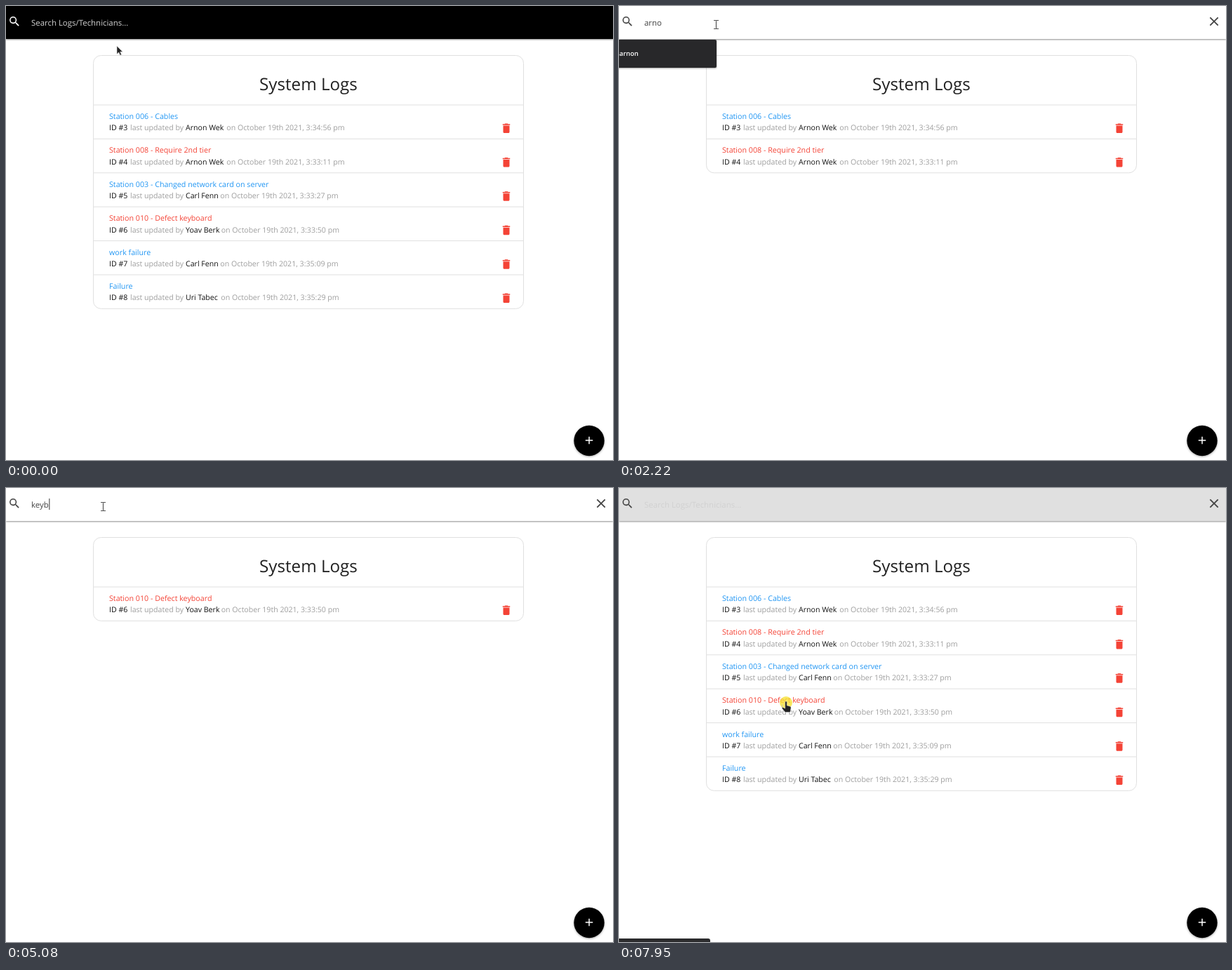
An HTML page that plays this animation: 865x647 px, repeating every 8000 ms.

```html
<!DOCTYPE html>
<html lang="en">
<head>
<meta charset="utf-8">
<title>System Logs</title>
<style>
  html, body { margin: 0; width: 100%; height: 100%; overflow: hidden; background: #fff; }
  svg { display: block; width: 100%; height: 100%; }
  text { font-family: "Open Sans", "Noto Sans", sans-serif; text-rendering: geometricPrecision; white-space: pre; }
  #nav { filter: drop-shadow(0 1px 1px rgba(0,0,0,.45)); }
  #fab { filter: drop-shadow(0 1.5px 1.5px rgba(0,0,0,.35)); }
  #input, #hint { font-size: 11.45px; }
  #hint { fill: #d1d1d1; }
  #input { fill: #444; }
  #heading { font-size: 24.2px; fill: #212121; text-anchor: middle; }
  #rows text { font-size: 10.6px; fill: #9e9e9e; }
  #rows .title { font-size: 10.7px; }
  #rows .dark { fill: #111; }
  .line { fill: none; stroke: #e0e0e0; }
  #drop { transform-origin: 62px 68px; filter: drop-shadow(0 1px 1px rgba(0,0,0,.35)); }
  #drop text { font-size: 9.4px; font-weight: 600; fill: #fff; }
</style>
</head>
<body>
<svg id="stage" viewBox="0 0 865 647">
  <rect width="865" height="647" fill="#fff"/>
  <rect id="card" class="line" x="124.5" y="70.5" width="613" rx="11"/>
  <text id="heading" x="431" y="119.5">System Logs</text>
  <g id="rows"></g>

  <rect id="nav" width="865" height="47"/>
  <path id="lens" transform="translate(2.7 12.7) scale(.78)" d="M15.5 14h-.79l-.28-.27A6.47 6.47 0 0 0 16 9.5 6.5 6.5 0 1 0 9.5 16c1.61 0 3.09-.59 4.23-1.57l.27.28v.79l5 4.99L20.49 19zm-6 0a4.5 4.5 0 1 1 0-9 4.5 4.5 0 0 1 0 9z"/>
  <path id="close" transform="translate(837.2 11.2) scale(.9)" fill="#444" d="M19 6.41 17.59 5 12 10.59 6.41 5 5 6.41 10.59 12 5 17.59 6.41 19 12 13.41 17.59 19 19 17.59 13.41 12z"/>
  <text id="hint" x="36" y="27.5">Search Logs/Technicians...</text>
  <text id="input" x="36" y="27.5"></text>
  <rect id="caret" y="15" width="1" height="16" fill="#333"/>
  <g id="drop"></g>

  <circle id="fab" cx="831" cy="619.5" r="21.7"/>
  <path transform="translate(822 610) scale(.75)" fill="#fff" d="M19 13h-6v6h-2v-6H5v-2h6V5h2v6h6z"/>
  <path id="status" d="M0 0H127q3 0 3 3V24H0z" fill="#2b2b2d"/>

  <g id="pointer">
    <circle id="click" cy="2" r="9" fill="#f5e02a" opacity=".75"/>
    <path id="arrow" d="M0 0V11.5L2.7 9 4.6 13.2 6.5 12.3 4.7 8.3H8.2Z" fill="#222" stroke="#ddd" stroke-width=".6"/>
    <path id="beam" d="M-3.5-5.5h3l.5.5.5-.5h3M0-5V6M-3.5 6.5h3L0 6l.5.5h3" fill="none" stroke="#555" stroke-width="1.2"/>
    <path id="hand" d="M-1.3.8Q0-.8 1.3.8V6L6 7.2Q7.3 7.8 7 9.6L6 15.5H-1.2L-5.6 10.2Q-5-.0 -5 8.4L-1.3 10.2Z" fill="#222" stroke="#ddd" stroke-width=".5"/>
  </g>
</svg>

<script>
const $ = id => document.getElementById(id);
const LOOP = 8000, STEP = 48.4, BLUE = '#2196f3', RED = '#f44336';
const TRASH = 'M6 19c0 1.1.9 2 2 2h8c1.1 0 2-.9 2-2V7H6v12zM19 4h-3.5l-1-1h-5l-1 1H5v2h14V4z';

// title, colour, id, technician, x of the date, time
const logs = [
  ['Station 006 - Cables', BLUE, 3, 'Arnon Wek', 314.3, '3:34:56'],
  ['Station 008 - Require 2nd tier', RED, 4, 'Arnon Wek', 314.3, '3:33:11'],
  ['Station 003 - Changed network card on server', BLUE, 5, 'Carl Fenn', 305.3, '3:33:27'],
  ['Station 010 - Defect keyboard', RED, 6, 'Yoav Berk', 306.7, '3:33:50'],
  ['work failure', BLUE, 7, 'Carl Fenn', 305.3, '3:35:09'],
  ['Failure', BLUE, 8, 'Uri Tabec', 306.3, '3:35:29']
];
$('rows').innerHTML = logs.map(([title, color, id, name, x, time]) => `<g>
  <path class="line" d="M125 141H737"/>
  <text class="title" x="147" y="161" style="fill:${color}">${title}</text>
  <text y="177.4"><tspan class="dark" x="147">ID #${id}</tspan><tspan x="177">last updated by</tspan><tspan
    class="dark" x="256">${name}</tspan><tspan x="${x}">on October 19th 2021, ${time} pm</tspan></text>
  <path transform="translate(704 165.3) scale(.75)" fill="${RED}" d="${TRASH}"/></g>`).join('');
const rows = [...$('rows').children];

const typed = [[0, ''], [330, 'a'], [400, 'ar'], [600, 'arn'], [930, 'arno'], [1280, 'arnon'],
  [2220, 'arno'], [2350, 'arn'], [2550, 'ar'], [2750, 'a'], [3070, ''],
  [3280, 'k'], [3410, 'ke'], [3620, 'key'], [3890, 'keyb'], [4090, 'keybo'],
  [5080, 'keyb'], [5490, 'ke'], [5560, 'k'], [5620, '']];
const shown = [[0, '012345'], [730, '013'], [930, '01'], [2680, '013'], [2880, '012345'],
  [3480, '234'], [3620, '3'], [5890, '012345']];
const caretOn = [[0, 0], [270, 1], [1820, 0], [3280, 1], [4550, 0], [4950, 1], [6160, 0], [6490, 1], [7000, 0]];
// start, suggestions, start of fade
const drops = [[0, '', 0], [400, 'arnon', 1280], [2220, 'arnon', 2750], [2750, 'asd asdasd arnon', 3070]];
const path = [[0, 158, 57], [60, 158, 57], [200, 138.5, 26], [6480, 138.5, 26], [6490, 154, 60],
  [6750, 330, 140], [7050, 660, 285], [7200, 722, 306], [7330, 700, 306], [7820, 238, 304], [8000, 238, 304]];
const shapes = [[0, 'arrow'], [130, 'beam'], [6490, 'arrow'], [7150, 'hand'], [7340, 'arrow'], [7760, 'hand']];

const at = (list, t) => list.findLast(e => e[0] <= t);
const ramp = (t, from, span) => Math.min(1, Math.max(0, (t - from) / span));
const gray = v => `rgb(${v},${v},${v})`;
const show = (el, on) => el.style.display = on ? '' : 'none';

function position(t) {
  const i = path.findLastIndex(p => p[0] <= t);
  const [t0, x0, y0] = path[i], [t1, x1, y1] = path[i + 1];
  const k = (t - t0) / (t1 - t0);
  return [x0 + (x1 - x0) * k, y0 + (y1 - y0) * k];
}

function drawDrop(t) {
  const [start, words, fade] = at(drops, t);
  const alpha = start ? 1 - ramp(t, fade, 143) : 0;
  show($('drop'), alpha > 0);
  if (!alpha) return;
  const items = words.split(' '), h = 13 + 27 * items.length;
  $('drop').innerHTML = `<path d="M-20 48H137q2 0 2 2V${46 + h}q0 2-2 2H-20z" fill="#28282a"/>` +
    items.map((s, i) => `<text x=".5" y="${71.3 + 27 * i}">${s}</text>`).join('');
  $('drop').style.transformOrigin = `62px ${48 + h / 2}px`;
  $('drop').style.transform = `scale(${1 - .05 * (1 - alpha)})`;
  $('drop').style.opacity = alpha;
}

function draw(t) {
  const focus = ramp(t, 130, 180) - ramp(t, 7890, 500);
  $('nav').style.fill = gray(255 * focus);
  $('lens').style.fill = gray(255 - 187 * Math.min(1, focus * 1.14));
  $('close').style.opacity = Math.min(1, focus * 1.14);

  const text = at(typed, t)[1];
  $('input').textContent = text;
  show($('hint'), !text);
  show($('caret'), at(caretOn, t)[1]);
  $('caret').setAttribute('x', 36 + (text ? $('input').getComputedTextLength() + .6 : 0));

  const list = at(shown, t)[1];
  rows.forEach((row, i) => {
    const n = list.indexOf(i);
    show(row, n >= 0);
    row.setAttribute('transform', `translate(0 ${n * STEP})`);
  });
  $('card').setAttribute('height', 70.5 + STEP * list.length);
  drawDrop(t);

  const shape = at(shapes, t)[1];
  for (const id of ['arrow', 'beam', 'hand']) show($(id), id === shape);
  show($('click'), t > 130 && t < 260 || t > 7850);
  $('pointer').setAttribute('transform', `translate(${position(t)})`);
  $('status').setAttribute('transform', `translate(0 ${647 - 5 * ramp(t, 7880, 70)})`);
}

const begin = performance.now();
function tick() {
  draw((performance.now() - begin) % LOOP);
  requestAnimationFrame(tick);
}
tick();
</script>
</body>
</html>
```
